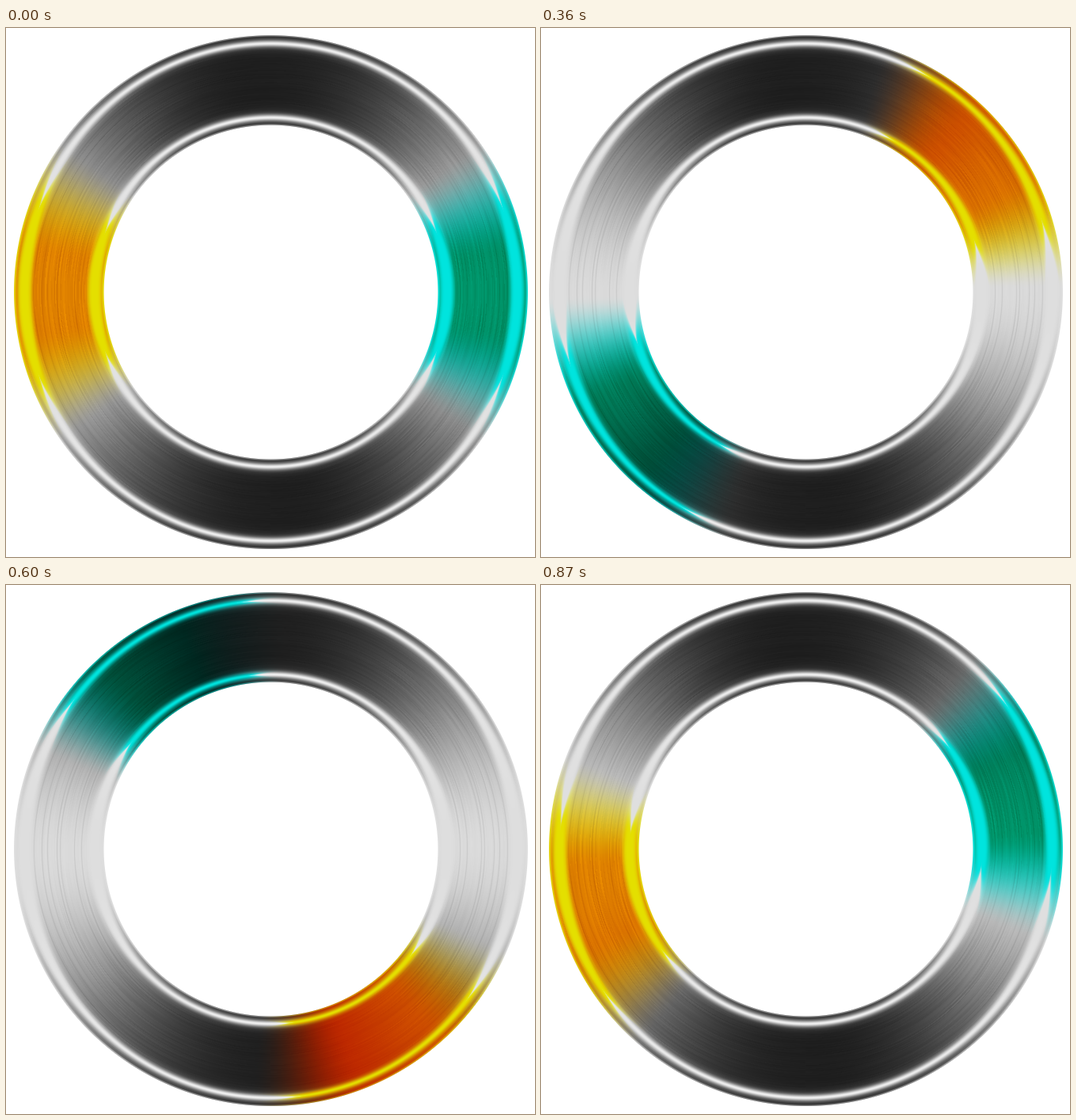
An HTML page with a canvas for the animation above (0.9 s loop, 668x668 px).

```html
<!DOCTYPE html>
<html lang="en">
<head>
<meta charset="utf-8">
<title>Metal ring</title>
<style>
  html, body { margin: 0; width: 100%; height: 100%; overflow: hidden; background: #fff; }
  canvas { display: block; width: 668px; height: 668px; }
</style>
</head>
<body>
<canvas id="stage" width="668" height="668"></canvas>
<script>
const SIZE = 668, CX = 334.5, CY = 333.6, R_OUT = 324.4, R_IN = 211;
const STEP = 30, STEPS = 30, TURN = 11.93;
const GROOVES = [239, 248, 266, 270, 282, 289, 299];

const ctx = document.getElementById('stage').getContext('2d');
const image = ctx.createImageData(SIZE, SIZE);
const out = image.data;
out.fill(255);

const clamp = (v, a = 0, b = 1) => Math.min(b, Math.max(a, v));
const mix = (a, b, t) => a + (b - a) * t;
const smooth = t => t * t * (3 - 2 * t);
const bell = (d, w) => Math.exp(-((d / w) ** 2));

// Seeded random value in -1..1 for a cell
function hash(a, b) {
  let n = Math.imul(a + 71, 374761393) ^ Math.imul(b + 13, 668265263);
  n = Math.imul(n ^ (n >>> 13), 1274126177);
  return ((n ^ (n >>> 16)) >>> 0) / 2147483648 - 1;
}

// Brushed grain: fine across the radius, long along the arc
function grain(r, deg) {
  const ring = Math.floor(r / 1.2), p = (deg + 360) / 9, cell = Math.floor(p);
  return 0.6 * mix(hash(ring, cell), hash(ring, cell + 1), smooth(p - cell))
       + 0.4 * hash(ring, 999);
}

const groove = r => GROOVES.reduce((sum, g) => sum + bell(r - g, 0.8), 0);

const warmBand = u => [176 + 48 * Math.sqrt(u), 16 + 114 * u ** 0.6, 0];
const coolBand = u => [16 * clamp(1 - 12 * u), 22 + 126 * u ** 0.8, 22 + 83 * u ** 0.85];
const WARM_RIM = [228, 223, 0], COOL_RIM = [0, 228, 222];

// Each pixel: place, angle, where the tint ends, fade width, then three colours
const pixels = [];

function addPixel(x, y) {
  const dx = x + 0.5 - CX, dy = y + 0.5 - CY, r = Math.hypot(dx, dy);
  const cover = clamp(R_OUT - r + 0.5) * clamp(r - R_IN + 0.5);
  if (!cover) return;

  const phi = Math.atan2(dx, -dy), deg = phi * 180 / Math.PI;
  const side = Math.sin(phi) ** 2;
  const u = Math.abs(Math.sin(phi)) ** 2.5;

  // Rim highlights: narrow lines at top and bottom, wide bands at the sides
  const w = mix(4.2, 9, side ** 2.5), p = mix(1.8, 4.5, side ** 3);
  const d = Math.min(Math.abs(r - mix(314, 311, side)), Math.abs(r - mix(220.5, 222.5, side)));
  const edgeWidth = mix(0.9, 1.7, side);
  const edge = bell(r - R_OUT + 0.6, edgeWidth) + bell(r - R_IN - 0.6, edgeWidth);
  const h = clamp(Math.exp(-((d / w) ** p)) + edge * mix(0.45, 0.85, side));

  const noise = grain(r, deg), cut = groove(r) * u;
  const base = 30 + 188 * u + 10 * Math.sin(phi) * Math.cos(phi) + 22 * (1 - u) * bell(d, 11);
  const grey = base + noise * (2.5 + 22 * u * (1 - u)) - 15 * cut;
  const tone = noise * (3 + 11 * u) - 14 * cut;

  const toPaper = c => mix(255, c, cover);
  const tint = (band, rim) => band.map((c, i) =>
    toPaper(mix(c > 0 ? clamp(c + tone, 0, 255) : 0, rim[i], h)));

  const q = clamp(1 - d / w);
  pixels.push({
    at: (y * SIZE + x) * 4,
    deg,
    end: 36 - 14 * q + 5 * q * (1 - side),
    fade: 5 + 22 * (1 - q) ** 2,
    grey: toPaper(mix(grey, 240 - 18 * side, h)),
    warm: tint(warmBand(u), WARM_RIM),
    cool: tint(coolBand(u), COOL_RIM)
  });
}

for (let y = 0; y < SIZE; y++)
  for (let x = 0; x < SIZE; x++) addPixel(x, y);

function draw(step) {
  const centre = -90 + step * TURN;
  for (const px of pixels) {
    const gap = Math.abs((px.deg - centre + 900) % 360 - 180);
    const isWarm = gap < 90;
    const off = isWarm ? gap : 180 - gap;
    const a = smooth(clamp((px.end - off) / px.fade));
    const fast = 1 - (1 - a) * (1 - a), slow = a * a;
    const c = isWarm ? px.warm : px.cool;
    out[px.at] = mix(px.grey, c[0], isWarm ? a : fast);
    out[px.at + 1] = mix(px.grey, c[1], slow);
    out[px.at + 2] = mix(px.grey, c[2], isWarm ? fast : slow);
  }
  ctx.putImageData(image, 0, 0);
}

let shown = -1;
function tick() {
  const step = Math.floor(performance.now() / STEP) % STEPS;
  if (step !== shown) draw(shown = step);
  requestAnimationFrame(tick);
}
tick();
</script>
</body>
</html>
```
